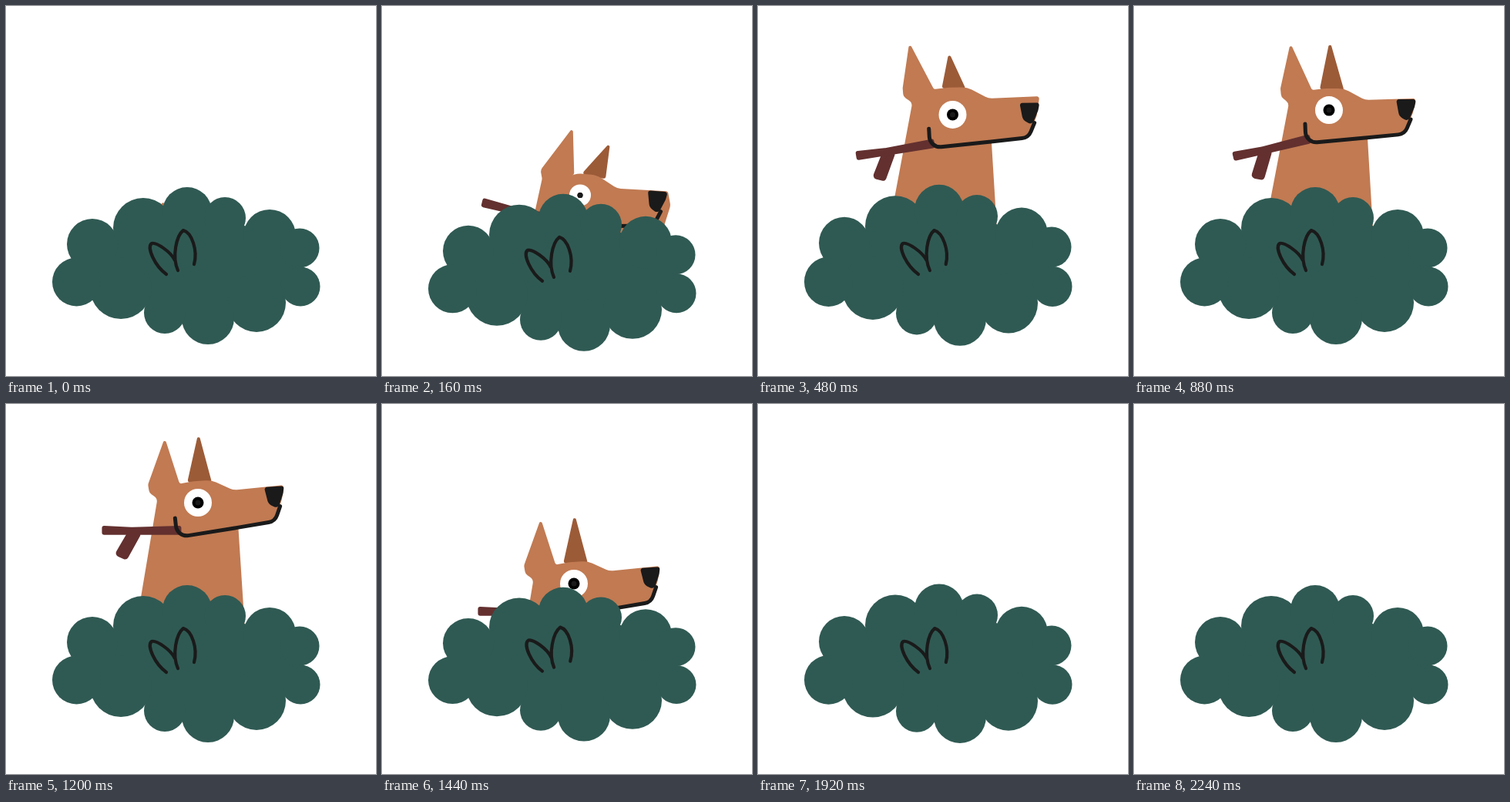
Animation, 480 px wide and 480 px high, one loop 2.32 s. Source, as an HTML page with a canvas:

```html
<!DOCTYPE html>
<html lang="en">
<head>
<meta charset="utf-8">
<title>Dog behind a bush</title>
<style>
  html, body { margin: 0; width: 100%; height: 100%; overflow: hidden; background: #fff; }
  canvas { display: block; width: 100vw; height: 100vh; }
</style>
</head>
<body>
<canvas id="stage" width="480" height="480"></canvas>
<script>
const ctx = document.getElementById('stage').getContext('2d');
const STEP = 80, STEPS = 29;
const FUR = '#c17a52', FUR_DARK = '#9c5b37', WOOD = '#63302f', LEAF = '#2f5a53', INK = '#1a1a1a';

// Centre and radius of each lobe, clockwise
const LOBES = [
  [112, 309, 33], [178, 288, 39], [235, 267, 32], [284, 275, 27], [342, 298, 34], [381, 314, 25.5],
  [382, 364, 25.5], [325, 385, 38], [262, 405, 34], [206, 398, 27], [149, 366, 40], [91.5, 358, 31.5]
];

const clamp = v => Math.min(1, Math.max(0, v));

// One smooth bump between two times, zero elsewhere
const hump = (s, from, to) => s > from && s < to ? Math.sin(Math.PI * (s - from) / (to - from)) : 0;

// Points are [x, y, corner radius]
function trace(points, closed = true) {
  const n = points.length, [first, last] = [points[0], points[n - 1]];
  ctx.beginPath();
  if (closed) ctx.moveTo((first[0] + last[0]) / 2, (first[1] + last[1]) / 2);
  else ctx.moveTo(first[0], first[1]);
  for (let i = closed ? 0 : 1; i < (closed ? n : n - 1); i++) {
    const [x, y, r = 3] = points[i], next = points[(i + 1) % n];
    ctx.arcTo(x, y, next[0], next[1], r);
  }
  if (closed) ctx.closePath();
  else ctx.lineTo(last[0], last[1]);
}

function shape(points, color) {
  trace(points);
  ctx.fillStyle = color;
  ctx.fill();
}

function disc(x, y, r, color) {
  ctx.beginPath();
  ctx.arc(x, y, r, 0, Math.PI * 2);
  ctx.fillStyle = color;
  ctx.fill();
}

function stroke(width) {
  ctx.strokeStyle = INK;
  ctx.lineWidth = width;
  ctx.lineCap = ctx.lineJoin = 'round';
  ctx.stroke();
}

// Height below the resting place: leap, overshoot, then dive
function dogDrop(s) {
  const leap = 203 * clamp(1 - s / 4) - 20 * hump(s, 4, 6);
  const u = Math.max(0, s - 15);
  return leap + 19 * u * u - 22 * u;
}

// Loose parts trail during the leap, then swing back and settle
function dogDrag(s) {
  const u = Math.max(0, s - 4);
  return Math.min(1, s) * Math.exp(-.8 * u) * Math.cos(1.21 * u);
}

function drawStick([x, y], angle) {
  ctx.save();
  ctx.translate(x, y);
  ctx.rotate(angle);
  shape([[-99, -6], [-60, -4, 30], [4, -6], [4, 6], [-50, 6, 30], [-99, 6]], WOOD);
  shape([[-66, 3], [-47, 3], [-67, 39, 5], [-83, 32, 5]], WOOD);
  ctx.restore();
}

function drawDog(s) {
  const drop = dogDrop(s);
  if (drop > 230) return;
  const drag = dogDrag(s), brace = clamp(s - 14);
  const slack = Math.max(0, drag), sag = 48 * Math.max(0, -drag);
  const tilt = (5 * drag - 4 * brace) * Math.PI / 180;
  const cos = Math.cos(tilt), sin = Math.sin(tilt);

  // The head turns around the eye; the face can sag below the skull
  const skull = (x, y, r) => {
    const dx = x - 253, dy = y - 135;
    return [253 + dx * cos - dy * sin + 4 * (drag - brace),
            135 + dx * sin + dy * cos + 9 * drag - 7 * brace + drop, r];
  };
  const face = (x, y, r) => skull(x, y + sag, r);
  const jaw = (x, y, r) => face(x + 9 * slack, y + 20 * slack, r);

  ctx.save();
  ctx.beginPath();
  ctx.rect(0, 0, 480, 325);
  ctx.clip();

  const flop = 19 * Math.min(1, 6 * Math.abs(drag));
  shape([
    skull(254 + 32 * drag + 6 * brace, 44 + flop, 2),
    skull(273 + 11 * drag, 111), skull(241 + 11 * drag, 108)
  ], FUR_DARK);

  shape([
    skull(203 + 33 * drag + 13 * brace, 48, 2),
    skull(190 + 9 * drag, 107, 8), skull(191 + 11 * drag, 118, 8), skull(201, 126, 8),
    [160, 340 + drop], [313, 340 + drop],
    face(303, 172 + 20 * slack, 1), jaw(341, 168, 10), jaw(352, 163, 12),
    face(362 + 9 * slack, 138, 12),
    skull(366, 120), skull(300, 122, 18), skull(272, 107, 28), skull(248, 107, 30),
    skull(231 + 12 * drag, 109)
  ], FUR);

  const wag = (26 * Math.abs(drag) + 13 * brace - 13) * Math.PI / 180;
  drawStick(face(225, 173 - 4 * (Math.abs(drag) + brace)), wag);

  shape([face(340, 121), face(366, 121), face(364, 131, 8), face(356, 150, 5), face(344, 143, 10)], INK);
  trace([face(222, 153), face(223, 178, 14), face(300, 171, 60), face(351, 166, 14), face(359, 147)], false);
  stroke(5);

  const [x, y] = face(253, 135);
  disc(x, y, 18 - 4 * slack, '#fff');
  disc(x, y, 7.5 - 4 * slack, '#000');
  disc(x, y, 3.5, INK);
  ctx.restore();
}

function drawBush(s) {
  const push = 9 * hump(s, 0, 4.6);
  const squash = hump(s, 17.5, 22.5) - .2 * hump(s, 22, 25) - .35 * hump(s, 4, 8);

  ctx.save();
  ctx.translate(0, 366 + push);
  ctx.scale(1, 1 - .07 * squash);
  ctx.translate(0, -366);
  shape(LOBES.map(([x, y]) => [x, y, 0]), LEAF);
  LOBES.forEach(([x, y, r]) => disc(x, y, r, LEAF));
  ctx.restore();

  // Leaf mark leans as the bush flattens
  const lean = .07 * squash;
  ctx.save();
  ctx.transform(1, 0, -lean, 1, lean * 347, push - 4.5 * Math.max(squash, 0));
  ctx.beginPath();
  ctx.moveTo(208, 348);
  ctx.bezierCurveTo(193, 337, 182, 313, 189, 308);
  ctx.bezierCurveTo(195, 306, 214, 319, 219, 330);
  ctx.moveTo(223, 343);
  ctx.bezierCurveTo(215, 325, 221, 298, 230, 291);
  ctx.bezierCurveTo(241, 294, 249, 317, 244, 335);
  stroke(4.2);
  ctx.restore();
}

function frame() {
  const step = Math.floor(performance.now() / STEP) % STEPS;
  ctx.fillStyle = '#fff';
  ctx.fillRect(0, 0, 480, 480);
  drawDog(step);
  drawBush(step);
  requestAnimationFrame(frame);
}
frame();
</script>
</body>
</html>
```
